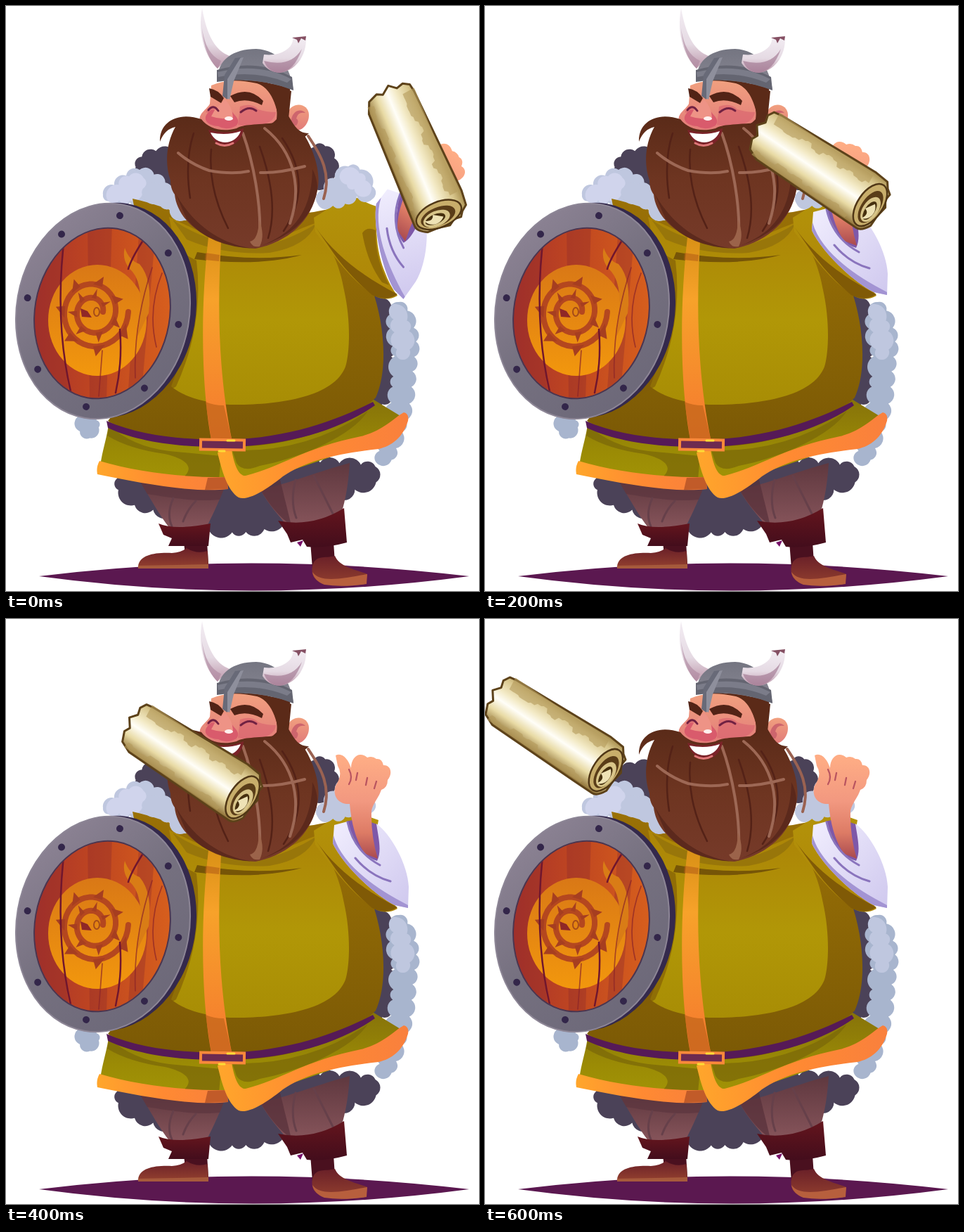
An HTML page for the animation above (0.7 s loop, 673 px wide and 832 px high).

```html
<!DOCTYPE html>
<html lang="en">
<head>
<meta charset="utf-8">
<title>Viking throwing a scroll</title>
<style>
html, body { margin: 0; width: 100%; height: 100%; overflow: hidden; background: #fff; }
svg { display: block; width: 100vw; height: 100vh; }
.line { fill: none; stroke-linecap: round; stroke-linejoin: round; }
</style>
</head>
<body>
<svg viewBox="0 0 673 832" preserveAspectRatio="none">
<defs>
  <linearGradient id="tunic" x2="0" y2="1"><stop stop-color="#ac8407"/><stop offset=".55" stop-color="#b19707"/><stop offset="1" stop-color="#a88d05"/></linearGradient>
  <linearGradient id="shade" x2="0" y2="1"><stop stop-color="#9a7106"/><stop offset="1" stop-color="#7b5905"/></linearGradient>
  <linearGradient id="skirt" x2="0" y2="1"><stop stop-color="#86720a"/><stop offset=".6" stop-color="#9b8b05"/><stop offset="1" stop-color="#a39506"/></linearGradient>
  <linearGradient id="sleeve" x2="0" y2="1"><stop stop-color="#b3930a"/><stop offset="1" stop-color="#ae8507"/></linearGradient>
  <linearGradient id="trim" x2="0" y2="1"><stop stop-color="#d99116"/><stop offset=".3" stop-color="#f7a22a"/><stop offset="1" stop-color="#f5782f"/></linearGradient>
  <linearGradient id="hem"><stop stop-color="#ffa62b"/><stop offset=".5" stop-color="#ff8a32"/><stop offset="1" stop-color="#f9803d"/></linearGradient>
  <linearGradient id="pants" x2="0" y2="1"><stop stop-color="#5f383f"/><stop offset="1" stop-color="#87555b"/></linearGradient>
  <linearGradient id="cuffs" x2="0" y2="1"><stop stop-color="#64151d"/><stop offset="1" stop-color="#430d1c"/></linearGradient>
  <linearGradient id="shoe" x2="0" y2="1"><stop stop-color="#6a2028"/><stop offset="1" stop-color="#93402f"/></linearGradient>
  <linearGradient id="skin" x2="0" y2="1"><stop stop-color="#f1a07f"/><stop offset="1" stop-color="#e17a79"/></linearGradient>
  <linearGradient id="arm" x2="0" y2="1"><stop stop-color="#ffae85"/><stop offset=".45" stop-color="#f29880"/><stop offset=".75" stop-color="#dd7b65"/><stop offset="1" stop-color="#a94a4f"/></linearGradient>
  <linearGradient id="beard" x2="0" y2="1"><stop stop-color="#592a18"/><stop offset=".5" stop-color="#6e3521"/><stop offset="1" stop-color="#763a29"/></linearGradient>
  <linearGradient id="iron" x2="0" y2="1"><stop stop-color="#747581"/><stop offset="1" stop-color="#8b8995"/></linearGradient>
  <linearGradient id="horn" x2="0" y2="1"><stop stop-color="#f3edf3"/><stop offset=".6" stop-color="#e5dae3"/><stop offset="1" stop-color="#bd98ab"/></linearGradient>
  <linearGradient id="rim" x2="1" y2="1"><stop stop-color="#93889a"/><stop offset=".5" stop-color="#75707f"/><stop offset="1" stop-color="#6a6677"/></linearGradient>
  <linearGradient id="wood"><stop stop-color="#a9322a"/><stop offset=".5" stop-color="#c14820"/><stop offset="1" stop-color="#d8601d"/></linearGradient>
  <linearGradient id="paint" x2="0" y2="1"><stop stop-color="#d97816"/><stop offset="1" stop-color="#f2970d"/></linearGradient>
  <linearGradient id="cuff" x2="1" y2="1"><stop stop-color="#f1eefe"/><stop offset="1" stop-color="#cfc8ee"/></linearGradient>
  <linearGradient id="paper" x2="0" y2="1"><stop stop-color="#a58b4b"/><stop offset=".18" stop-color="#d8c68c"/><stop offset=".4" stop-color="#f3eac6"/><stop offset=".55" stop-color="#fffef8"/><stop offset=".75" stop-color="#e8daa4"/><stop offset="1" stop-color="#8d6f34"/></linearGradient>
  <clipPath id="board"><ellipse cx="137" cy="437" rx="95" ry="121" transform="rotate(10 137 437)"/></clipPath>
</defs>

<path fill="#5b1850" d="M47 811Q345 774 659 811Q350 852 47 811Z"/>
<g id="cape"></g>

<g id="legs">
  <path fill="url(#pants)" d="M190 675L312 682C303 705 292 728 284 744L234 744C218 724 207 703 190 675Z"/>
  <path fill="#5b353e" opacity=".65" d="M190 675L312 682L304 702C270 706 228 698 201 694Z"/>
  <path fill="url(#pants)" d="M362 688C400 680 450 660 489 650C487 683 482 710 472 738L402 742C388 724 374 710 362 688Z"/>
  <path fill="#56303a" opacity=".7" d="M362 688L389 670L406 739Q382 722 362 688Z"/>
  <path class="line" stroke="#66404a" stroke-width="3" d="M238 700Q228 722 236 740M270 704Q258 716 252 733M412 674Q404 704 413 728M438 668L466 724"/>
  <path fill="#4a101f" d="M253 762L286 762L288 794L256 790ZM433 762L466 762L468 792L436 800Z"/>
  <path fill="url(#shoe)" d="M188 797C190 780 213 777 236 778Q250 777 257 771Q271 780 287 775L288 799L188 799Z"/>
  <path fill="#a65a3c" d="M188 796L288 794L288 800L188 800Z"/>
  <path fill="url(#shoe)" d="M436 796C441 780 453 786 468 782C474 798 500 802 514 808L512 822Q480 827 453 822C437 817 434 808 436 796Z"/>
  <path fill="#b75f3d" d="M436 805C448 822 482 813 514 808L513 822Q478 827 453 823Q438 817 436 805Z"/>
  <path fill="url(#cuffs)" d="M217 736Q240 746 291 736L288 768L231 768L236 757L224 752Z"/>
  <path fill="url(#cuffs)" d="M387 732Q436 742 481 714L485 763Q452 772 428 769L422 759L405 763L400 751Z"/>
  <path fill="#771068" d="M414 763L423 760L419 769Z"/>
</g>

<g id="dress">
  <path fill="url(#skirt)" d="M147 588C144 615 137 630 134 655L316 678L342 685C405 655 500 640 566 586L520 558Z"/>
  <path fill="#7b6909" opacity=".75" d="M147 596Q178 626 232 633L306 640L303 674L250 672C269 658 260 645 226 637Q175 630 144 611ZM322 632Q430 635 515 576C490 614 414 644 361 654Q337 664 328 650Z"/>
  <path fill="url(#hem)" d="M133 647C190 664 260 671 314 670L316 687C265 693 190 678 130 666Q128 656 133 647Z"/>
  <path fill="#c15b29" d="M287 671L314 670L316 687L283 688Z"/>
  <path fill="url(#hem)" d="M301 635L321 631C325 655 332 669 341 668C390 656 425 628 505 612C537 604 550 587 566 578Q574 580 572 590C565 614 548 626 530 630C474 636 427 646 394 669C367 691 343 704 331 699C315 689 307 661 301 635Z"/>
  <path fill="url(#shade)" d="M180 274C219 283 248 294 279 312L438 293C476 285 500 283 528 288L520 400C540 455 543 520 526 557C472 611 375 630 309 626C235 623 180 609 145 590C160 570 206 550 230 520Z"/>
  <path fill="url(#tunic)" d="M232 300C268 318 298 331 348 344C390 332 420 315 440 309C466 348 475 371 481 404C491 449 489 493 483 513C466 557 386 568 318 567Q260 562 235 541L265 460Z"/>
  <path fill="#98760a" d="M237 304Q285 337 352 344Q396 337 441 310Q428 342 375 351Q311 355 257 332Z"/>
  <path fill="#765507" d="M272 350Q350 364 421 354Q360 371 268 360Z"/>
  <path fill="#825c07" opacity=".65" d="M230 340L271 362Q282 454 242 541L212 560Z"/>
  <path fill="url(#trim)" d="M288 329L306 336C301 420 301 520 322 620L292 617C277 535 277 424 288 329Z"/>
  <path fill="#b65f16" opacity=".6" d="M284 563Q295 568 310 568L322 620L292 617ZM284 351L304 354L303 363L283 361Z"/>
  <path fill="#561a57" d="M143 590C192 612 252 616 300 617C395 617 467 591 522 563L525 568C474 604 395 627 308 627C237 628 181 617 145 600Z"/>
  <rect x="277" y="617" width="62" height="14" fill="#6d2a50" stroke="#f9893a" stroke-width="4" transform="rotate(1 308 624)"/>
  <path class="line" stroke="#ffdc36" stroke-width="3" d="M315 618L325 618M303 633L311 633"/>
</g>

<g id="upperArm">
  <path fill="url(#sleeve)" d="M438 301C462 286 483 270 500 273Q516 282 530 286C524 315 528 351 538 376Q546 398 557 412Q541 421 524 412C489 388 466 355 440 321Z"/>
  <path fill="#805a06" d="M440 314C470 357 508 384 557 410Q540 421 521 411C503 396 482 375 465 350Z"/>
  <path fill="#906b06" d="M507 323Q513 313 526 319C525 348 533 374 545 397L535 393Q514 365 507 323Z"/>
</g>
<g id="collar"></g>

<g id="head">
  <path class="line" stroke="#9a6251" stroke-width="4" d="M430 185C449 213 463 239 452 274"/>
  <path fill="#5a2918" d="M309 101L404 114C405 136 399 152 403 169Q414 183 431 181Q421 192 405 191L365 172L379 129Z"/>
  <path fill="url(#skin)" d="M400 153C407 134 431 138 431 155C431 172 415 182 403 176Z"/>
  <path fill="#cd656d" d="M406 161C409 147 421 146 426 152Q415 150 413 160Q418 163 413 170Q405 171 406 161Z"/>
  <path fill="url(#skin)" d="M292 113Q318 101 357 110C380 117 388 143 385 161C374 174 350 177 323 182C301 180 283 174 276 164C273 153 286 147 290 139Z"/>
  <path fill="#d9626f" opacity=".6" d="M333 143Q350 137 359 147Q370 151 384 151C382 169 355 174 330 169ZM290 143L307 145L300 155L284 151Z"/>
  <path fill="#5b2a18" d="M341 106C370 108 381 126 388 159Q396 166 402 160L406 121L364 106Z"/>
  <path fill="url(#beard)" d="M278 161C247 150 218 163 219 193Q226 175 241 172C229 193 225 222 234 248Q234 260 240 268C244 307 288 342 355 345C401 336 435 306 443 262C449 236 437 203 424 183L431 181C412 181 409 165 398 151C391 151 391 162 385 166C355 169 338 168 328 174C306 180 288 174 278 161Z"/>
  <path fill="#54251a" opacity=".75" d="M241 266C268 315 311 341 355 345Q289 343 257 303ZM363 341C413 322 435 288 436 232Q448 255 439 276Q424 321 363 341Z"/>
  <path class="line" stroke="#542217" stroke-width="2.5" d="M292 204Q287 259 316 316M267 181Q254 220 262 273M393 188Q439 254 395 320M361 200Q389 278 373 330"/>
  <path class="line" stroke="#9d6855" stroke-width="4" d="M245 209Q265 226 289 234Q321 240 345 235M362 237Q388 238 425 228M337 181C352 222 363 282 361 326M368 174C412 209 421 261 404 309"/>
  <path fill="#9b634a" d="M360 304Q369 326 361 342Q351 344 347 335Q359 333 360 304Z"/>
  <path fill="#7b2329" d="M288 176Q316 184 338 174C335 205 297 209 288 176Z"/>
  <path fill="#fff" d="M291 180Q314 185 334 178C326 199 299 199 291 180Z"/>
  <path class="line" stroke="#df7778" stroke-width="3" d="M299 195Q311 202 323 195"/>
  <path fill="#d95b6c" d="M292 148C277 158 284 170 302 171Q314 178 328 170C335 161 324 155 320 148Q309 136 300 148Z"/>
  <path fill="#ee9386" d="M298 146L312 133Q322 144 323 158Q309 163 292 157Z"/>
  <ellipse cx="317" cy="160" rx="6" ry="3" fill="#fff0ee"/>
  <path class="line" stroke="#712142" stroke-width="3" d="M288 148Q295 139 302 149M334 151Q346 141 356 149"/>
  <path fill="#522316" d="M289 117Q302 119 310 131L306 138L291 129ZM319 128Q346 113 366 135L364 141Q343 130 325 137Z"/>
  <path fill="url(#horn)" d="M279 3C286 43 298 63 318 71L301 89C284 72 272 41 279 3Z"/>
  <path fill="#ad879e" opacity=".6" d="M279 32Q284 68 306 78L301 89Q282 70 279 32Z"/>
  <path fill="url(#iron)" d="M301 106C300 76 324 61 356 61C389 63 404 86 409 119Q358 101 301 106Z"/>
  <path fill="#646571" d="M300 91Q357 74 407 101L409 120Q354 99 300 108Z"/>
  <path fill="#7b7c89" d="M301 94Q361 80 406 104L400 109Q354 90 302 101Z"/>
  <path fill="#8e8f9c" d="M333 74L338 73L324 107L318 133L311 130L314 103Z"/>
  <path fill="#686a78" d="M326 74L334 73L315 104L315 133L308 128L311 98Z"/>
  <path fill="url(#horn)" d="M367 69C388 72 410 61 408 45L416 47L427 44C428 73 410 93 389 95Q373 94 365 81Z"/>
  <path fill="#855063" d="M407 45L427 43L426 49L420 46L416 53L414 48Z"/>
  <path fill="#a17893" opacity=".65" d="M367 78Q405 88 421 61Q410 93 389 95Q373 94 367 78Z"/>
</g>

<g id="shield">
  <ellipse cx="147" cy="433" rx="123" ry="154" fill="#34294c" transform="rotate(10 147 433)"/>
  <ellipse cx="138" cy="434" rx="123" ry="154" fill="url(#rim)" stroke="#8d8696" stroke-width="2" transform="rotate(10 138 434)"/>
  <ellipse cx="137" cy="437" rx="97" ry="123" fill="#4a3550" transform="rotate(10 137 437)"/>
  <g clip-path="url(#board)">
    <rect x="35" y="310" width="205" height="252" fill="url(#wood)"/>
    <path fill="#892a2d" opacity=".35" d="M35 310L83 310Q70 430 91 560L35 560ZM116 310L151 310L143 560L119 560ZM190 310L213 320L192 560L173 560Z"/>
    <ellipse cx="130" cy="447" rx="70" ry="79" fill="url(#paint)"/>
    <path fill="#d97c16" d="M187 470Q199 400 180 378Q164 363 169 344Q175 362 190 367Q209 389 203 437Z"/>
    <g id="spiral"></g>
    <path class="line" stroke="#70162e" stroke-width="2.5" d="M84 321Q68 444 92 548M194 335Q178 360 174 374M162 460Q166 505 156 550"/>
    <path class="line" stroke="#8a2428" stroke-width="1.7" opacity=".7" d="M208 372Q181 452 184 529M222 380Q201 432 214 485M137 490L132 555"/>
    <path fill="#8f2727" d="M106 430L116 434L122 443L108 442Z"/>
    <ellipse cx="129" cy="435" rx="4" ry="6" fill="none" stroke="#a54b19" stroke-width="2"/>
  </g>
  <g id="rivets" fill="#33264a"></g>
</g>

<g id="forearm">
  <path fill="#7e58a8" d="M484 288Q504 282 528 292L542 346L511 343Z"/>
  <path fill="url(#arm)" d="M469 194C478 189 487 199 491 212C491 197 502 187 514 197Q521 194 527 199Q535 198 537 208C547 207 551 219 543 229Q543 240 534 243C530 255 522 262 520 273Q519 308 529 341L511 334Q493 309 489 263C473 264 464 252 469 237Q480 221 472 209Z"/>
  <path class="line" stroke="#b95560" stroke-width="2.3" d="M500 219L498 229M514 226L512 236M527 231L524 241M488 214Q494 225 488 235"/>
  <path fill="url(#cuff)" d="M467 293L486 288C490 317 511 339 528 344C535 330 530 312 527 291C548 306 572 350 573 381L572 411L553 407C519 389 478 347 465 319Z"/>
  <path fill="#a394d3" d="M466 308C478 350 527 384 572 407L572 411L553 407C519 389 478 347 465 319Z"/>
  <path class="line" stroke="#8a74bd" stroke-width="3" d="M486 289C494 326 519 343 532 350M497 340Q518 365 547 373"/>
</g>

<g id="scroll">
  <path fill="url(#paper)" stroke="#5d421a" stroke-width="3" stroke-linejoin="round" d="M-186 30L-192 16L-188 8L-197 -4L-189 -14L-192 -24L-187 -33L-176 -35L-20 -43L2 -41L8 -33L15 -28L14 -18L20 -9L17 8L17 24Q10 38 2 38L-29 38L-170 37Z"/>
  <g id="stains" fill="#b59b5c" opacity=".6"></g>
  <ellipse rx="18" ry="34" fill="#c8ae6b" stroke="#503716" stroke-width="2.5"/>
  <ellipse cx="2" cy="2" rx="13" ry="26" fill="#5a3d18"/>
  <ellipse cx="4" cy="5" rx="11" ry="20" fill="#d8c589"/>
  <ellipse cx="4" cy="7" rx="7" ry="15" fill="#46300f"/>
  <path fill="#eee2b5" d="M5 -5C15 4 11 19 0 23Q7 11 -3 8Z"/>
</g>
</svg>
<script>
const $ = id => document.getElementById(id);
function add(layer, tag, attrs) {
  const el = document.createElementNS("http://www.w3.org/2000/svg", tag);
  for (const key in attrs) el.setAttribute(key, attrs[key]);
  return $(layer).appendChild(el);
}
let seed = 7;
const random = () => (seed = seed * 16807 % 2147483647) / 2147483647;

// Turns a clockwise outline into a row of uneven, outward bulges.
function fur(layer, fill, d, size = 22) {
  const path = add(layer, "path", { d, fill });
  const length = path.getTotalLength(), count = Math.round(length / size);
  const spots = Array.from({ length: count }, (_, i) =>
    path.getPointAtLength((i + random() * .45) * length / count));
  let last = spots[count - 1];
  d = `M${last.x} ${last.y}`;
  for (const p of spots) {
    const r = Math.hypot(p.x - last.x, p.y - last.y) * .58;
    d += `A${r} ${r} 0 0 1 ${p.x} ${p.y}`;
    last = p;
  }
  path.setAttribute("d", d + "Z");
}
const dark = "#4b4258", mid = "#a8b5ce", light = "#bfc7df", pale = "#d0d4ec";
fur("cape", dark, "M158 672C250 655 440 640 532 656C536 676 522 688 488 688C470 712 430 718 390 732C382 746 340 750 310 748C270 745 245 735 225 718C190 716 155 706 158 672Z", 28);
fur("cape", dark, "M184 238C182 212 210 198 245 210L245 262L215 262Z");
fur("cape", dark, "M430 205C455 188 472 205 468 240L440 262Z");
fur("cape", dark, "M515 404L542 418C552 470 545 500 550 530L562 545L520 578Z");
fur("cape", mid, "M550 419C578 420 583 470 584 485C576 515 578 545 575 560C568 595 555 630 546 652L526 650L542 600C552 560 550 520 554 500C546 470 542 440 550 419Z");
fur("cape", light, "M550 424C572 425 573 465 577 485L560 508L553 470Z");
fur("cape", light, "M133 276C145 255 160 255 172 240C185 225 215 235 235 262L235 290L185 280Z");
fur("cape", pale, "M142 276C160 255 165 245 185 238C205 240 195 265 185 277Z");
fur("cape", mid, "M98 584L134 590L128 616C108 615 100 602 98 584Z");
fur("collar", light, "M190 262C215 245 240 255 262 290L258 306L240 302C235 280 210 275 190 270Z");
fur("collar", light, "M443 284C445 258 465 255 472 238C490 215 515 235 523 262L523 276C505 266 490 268 482 282L450 286Z");
fur("collar", pale, "M476 236C495 225 510 240 518 262L518 270L486 256Z");

// A thin thorned spiral cut out of the painted disc.
function onSpiral(turn, out = 0) {
  const a = turn * 2 * Math.PI, r = 50 - turn * 18 + out;
  return `${124 + r * Math.cos(a)} ${435 + r * 1.08 * Math.sin(a)}`;
}
const coil = Array.from({ length: 81 }, (_, i) => onSpiral(i / 40));
add("spiral", "path", { class: "line", d: "M" + coil.join("L"), stroke: "#b4471f", "stroke-width": 8 });
for (let turn = .05; turn < 2; turn += .14) {
  const d = `M${onSpiral(turn)}L${onSpiral(turn + .05, 13)}L${onSpiral(turn + .06)}Z`;
  add("spiral", "path", { d, fill: "#a63e20" });
}

for (let i = 0; i < 8; i++) {
  const a = i * Math.PI / 4;
  add("rivets", "circle", {
    cx: 138 + 109 * Math.cos(a), cy: 434 + 138 * Math.sin(a), r: 5, transform: "rotate(10 138 434)"
  });
}

// Ragged stains along both long edges of the parchment.
for (const [edge, depth] of [[-37, 20], [35, -11]]) {
  let d = `M-180 ${edge}`;
  for (let x = -178; x < -22; x += 9) d += `L${x} ${edge + depth * (.4 + random() * .6)}h6`;
  add("stains", "path", { d: d + `L-20 ${edge}Z` });
}

// The arm swings for two steps, then the scroll glides off and slows at the end.
const elbow = "559 403", stepTime = 100, steps = 7;
function draw() {
  const step = Math.floor(performance.now() / stepTime) % steps;
  const swing = 16.7 * Math.max(0, 2 - step);
  const glide = Math.min(Math.max(0, step - 2), 3), slow = Math.max(0, step - 5);
  const x = 548 - 105.7 * glide - 59 * slow, y = 283 - 14.7 * glide - 24 * slow;
  $("forearm").setAttribute("transform", `rotate(${swing} ${elbow})`);
  $("scroll").setAttribute("transform", `rotate(${swing} ${elbow}) translate(${x} ${y}) rotate(34)`);
  requestAnimationFrame(draw);
}
draw();
</script>
</body>
</html>
```
